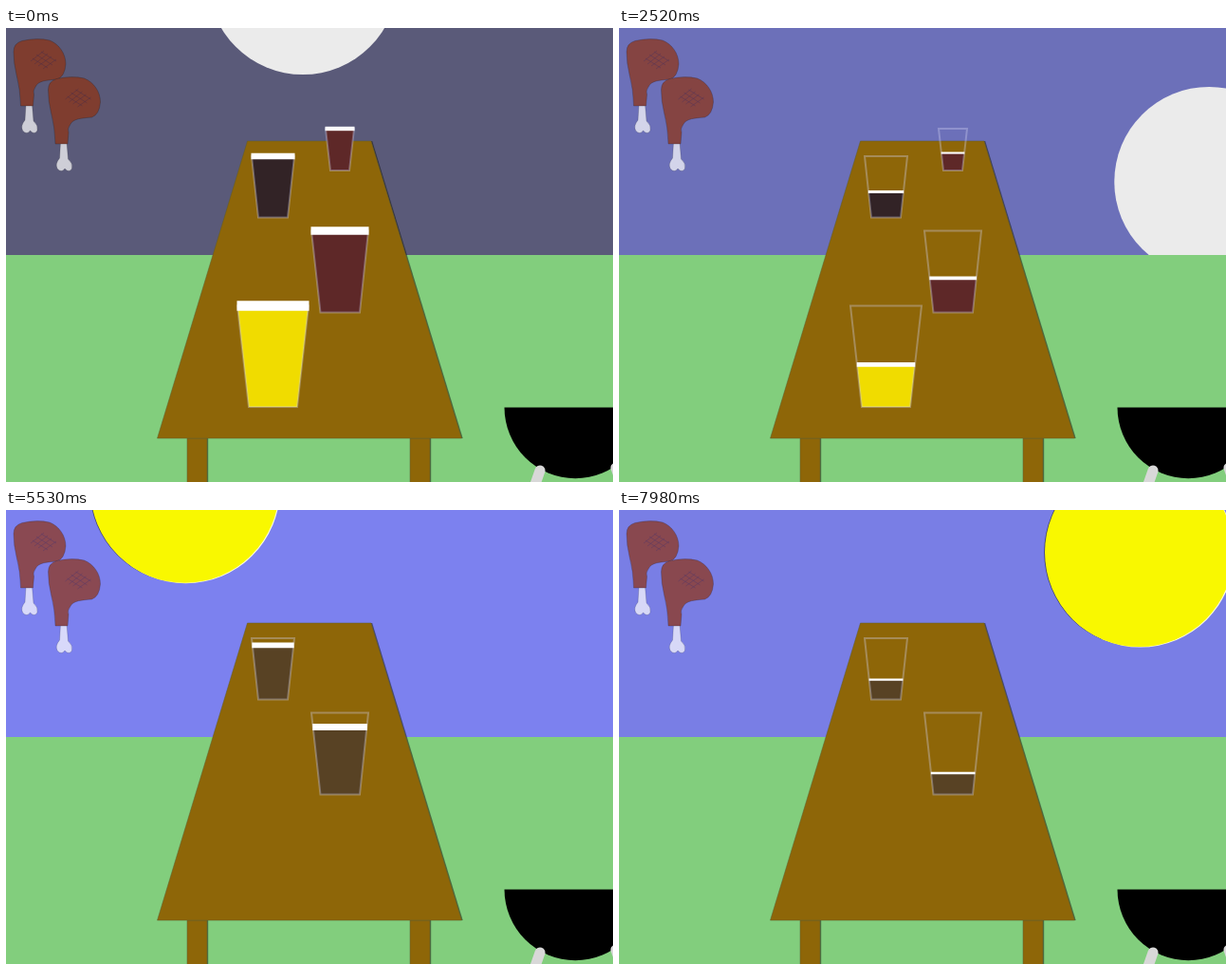
An HTML page that plays this animation: 640x478 px, repeating every 8000 ms.

```html
<!DOCTYPE html>
<html lang="en">
<head>
<meta charset="utf-8">
<title>Beer table</title>
<style>
  html, body { margin: 0; width: 100%; height: 100%; overflow: hidden; }
  svg { display: block; width: 100%; height: 100%; }
</style>
</head>
<body>
<svg viewBox="0 0 640 478">
  <defs>
    <g id="meat" stroke="#000" stroke-opacity=".28">
      <path d="M21 80 L20 97 Q15 103 17.500 108 Q22 113 25.500 108 Q30 113 33 108 Q34 102 29 98 L27.500 80Z" fill="#fff" stroke-width=".8"/>
      <path d="M8 25 Q8 16 17 13.500 Q33 10 46 13 C56 17 63 27 63 38 Q62 51 54 54 C44 55 34 55 31 62 Q28 66 29.500 70 L28.500 82 L15.500 82 Q15 64 11 49 Q8 37 8 25Z" fill="#903210"/>
      <path d="M26 35 L40 24 M30 38 L44 27 M34 40 L48 30 M39 43 L53 33 M32 28 L49 39 M37 25 L53 35 M28 32 L44 42" fill="none" stroke="#4c1c30" stroke-opacity=".55" stroke-width=".9"/>
    </g>
    <g id="table">
      <path d="M191 432V480H212V432Z M426 432V480H447V432Z"/>
      <path d="M254.500 119H385L480.500 432H159.500Z"/>
    </g>
  </defs>
  <rect id="sky" width="640" height="478"/>
  <circle id="moon" r="100" fill="#ebebeb"/>
  <g id="sun">
    <circle cx="-.8" r="99.500" opacity=".5"/>
    <circle cx="1" cy=".5" r="99.500" fill="#fdfde0"/>
    <circle r="99.500" fill="#f9f800"/>
  </g>
  <rect y="239" width="640" height="239" fill="#82ce7d"/>
  <g opacity=".7">
    <use href="#meat"/>
    <use href="#meat" x="36.500" y="40"/>
  </g>
  <use href="#table" x="1.200" opacity=".45"/>
  <use href="#table" fill="#8e6608" stroke="#5c5c30" stroke-opacity=".5"/>
  <g id="glasses"></g>
  <path d="M525.500 399.500H675A74.750 74.750 0 0 1 525.500 399.500Z"/>
  <path d="M563 466L556 486M643 463L650 483" stroke="#d8d8d8" stroke-width="11" stroke-linecap="round"/>
</svg>
<script>
const LOOP = 8000, STEP = 70;
const DRINK = 4340, POUR = 330, REST = 100; // ms to empty, to refill and to stand full
const NIGHT = [90, 90, 120], DAWN = [115, 120, 211], NOON = [128, 133, 251];
const $ = id => document.getElementById(id);
const mix = (a, b, k) => a.map((v, i) => v + (b[i] - v) * k);

// top: left, right, y; base: left, right, y; next: when drinking the refill begins
const glasses = [
  { top: [337, 367, 106], base: [342, 362, 150], foam: 4, color: '#5e2828' },
  { top: [259, 304, 135], base: [266, 297, 199.5], foam: 6, color: '#322326', next: 5040 },
  { top: [322, 382, 213.5], base: [331.5, 373, 299.5], foam: 8, color: '#5e2828', next: 4770 },
  { top: [244, 319, 292.5], base: [256, 307, 399], foam: 10, color: '#f0dc00' }
];

function add(parent, tag, attrs = {}) {
  const el = document.createElementNS('http://www.w3.org/2000/svg', tag);
  for (const key in attrs) el.setAttribute(key, attrs[key]);
  return parent.appendChild(el);
}

const section = ([l1, r1, y1], [l2, r2, y2]) => `M${l1} ${y1}H${r1}L${r2} ${y2}H${l2}Z`;

for (const g of glasses) {
  g.node = add($('glasses'), 'g');
  g.beer = add(g.node, 'path');
  add(g.node, 'path', { d: section(g.top, g.base), fill: 'none', stroke: '#d0d0f0', 'stroke-opacity': .35, 'stroke-width': 2 });
  g.head = add(g.node, 'path', { stroke: '#fff' });
}

function fillLevel(g, t) {
  if (t < DRINK) return 1 - t / DRINK;
  const poured = (t - g.next + REST + POUR) / POUR;
  const drunk = (t - g.next) / DRINK;
  return Math.max(0, Math.min(1, poured, 1 - drunk));
}

function drawGlass(g, t) {
  const refilled = t >= DRINK;
  g.node.style.display = refilled && !g.next ? 'none' : '';
  if (refilled && !g.next) return;
  const level = fillLevel(g, t);
  const surface = mix(g.base, g.top, level);
  g.beer.setAttribute('d', section(surface, g.base));
  g.beer.setAttribute('fill', refilled ? '#584224' : g.color);
  g.head.setAttribute('d', `M${surface[0] - level / 2} ${surface[2]}H${surface[1] + level / 2}`);
  g.head.setAttribute('stroke-width', level > 0 ? g.foam * level + .4 : 0);
}

function place(el, degrees) {
  const a = degrees * Math.PI / 180;
  el.setAttribute('transform', `translate(${320 + 321 * Math.sin(a)} ${270 - 321 * Math.cos(a)})`);
}

function skyColor(moonAngle) {
  const day = 180 - Math.abs(180 - Math.abs(moonAngle)); // 0 at midnight, 180 at noon
  const rgb = day < 98 ? mix(NIGHT, DAWN, day / 98) : mix(DAWN, NOON, (day - 98) / 82);
  return `rgb(${rgb.map(Math.round)})`;
}

function draw(ms) {
  const t = Math.floor(ms % LOOP / STEP) * STEP;
  const angle = -1.25 + .0284 * t; // clockwise from the top
  place($('moon'), angle);
  place($('sun'), angle + 180);
  $('sky').setAttribute('fill', skyColor(angle));
  glasses.forEach(g => drawGlass(g, t));
}

const start = performance.now();
function tick() {
  draw(performance.now() - start);
  requestAnimationFrame(tick);
}
tick();
</script>
</body>
</html>
```
